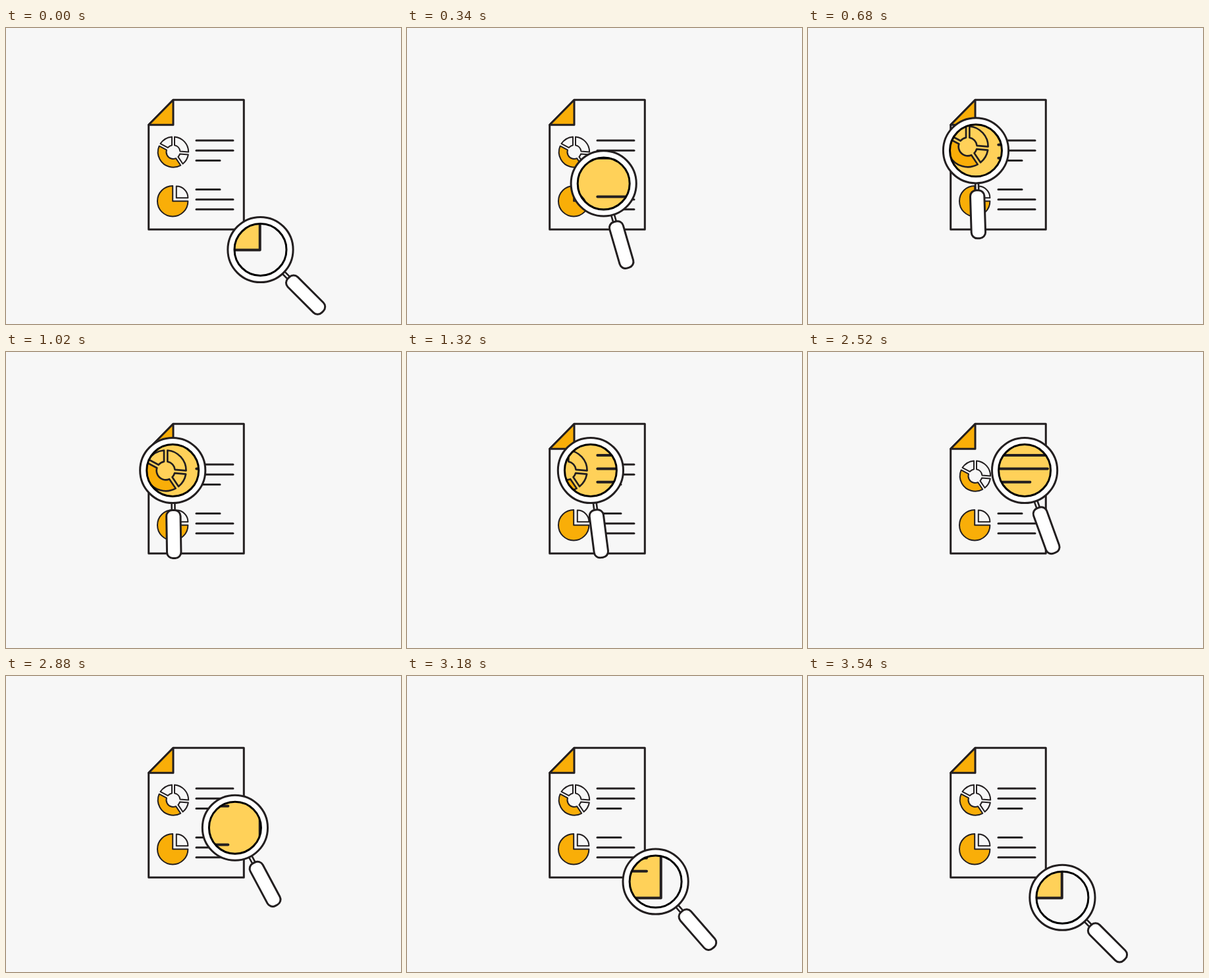
An HTML page with a canvas that plays this animation: 600 by 450 pixels, repeating every 3730 ms.

```html
<!DOCTYPE html>
<html lang="en">
<head>
<meta charset="utf-8">
<title>Report inspection</title>
<style>
  html, body { margin: 0; width: 100%; height: 100%; overflow: hidden; background: #f7f7f7; }
  canvas { display: block; width: 600px; height: 450px; }
</style>
</head>
<body>
<canvas id="stage" width="600" height="450"></canvas>
<script>
const ctx = document.getElementById('stage').getContext('2d');
const LOOP = 3730;
const PAPER = '#f7f7f7', INK = '#231f20', ORANGE = '#f9ae08', GLOW = '#ffd159';
const RAD = Math.PI / 180;

// Lens poses; the tilt of the handle is in degrees from straight down.
const POSES = [
  { t: 5, x: 386.5, y: 337, tilt: 45 },
  { t: 908, x: 249.5, y: 180, tilt: 0 },
  { t: 2690, x: 329.5, y: 180, tilt: 20 },
  { t: 3590, x: 386.5, y: 337, tilt: 45 }
];

// Cubic Bezier (0.25, 0.1, 0.25, 1), solved by bisection.
function ease(u) {
  let low = 0, high = 1;
  for (let i = 0; i < 24; i++) {
    const s = (low + high) / 2;
    if (0.75 * s * (1 - s) + s ** 3 < u) low = s; else high = s;
  }
  const s = low, r = 1 - s;
  return 0.3 * s * r * r + 3 * r * s * s + s ** 3;
}

function poseAt(time) {
  let i = 0;
  while (i < POSES.length - 2 && time >= POSES[i + 1].t) i++;
  const a = POSES[i], b = POSES[i + 1];
  const u = Math.min(1, Math.max(0, (time - a.t) / (b.t - a.t)));
  const p = u === 0 || u === 1 ? u : ease(u);
  const mix = key => a[key] + (b[key] - a[key]) * p;
  return { x: mix('x'), y: mix('y'), tilt: mix('tilt') };
}

function paint(fill, width, stroke = INK) {
  if (fill) {
    ctx.fillStyle = fill;
    ctx.fill();
  }
  ctx.strokeStyle = stroke;
  ctx.lineWidth = width;
  ctx.stroke();
}

function polygon(points) {
  ctx.beginPath();
  points.forEach(([x, y]) => ctx.lineTo(x, y));
  ctx.closePath();
}

function circle(x, y, r) {
  ctx.beginPath();
  ctx.arc(x, y, r, 0, 2 * Math.PI);
}

// Ring segment whose straight sides run parallel to the gaps.
function ringSegment(from, to, fill) {
  const outer = 23.2, inner = 10.5, gap = 2;
  const inset = r => Math.asin(gap / r);
  const a = from * RAD, b = to * RAD;
  ctx.beginPath();
  ctx.arc(254, 188.5, outer, a + inset(outer), b - inset(outer));
  ctx.arc(254, 188.5, inner, b - inset(inner), a + inset(inner), true);
  ctx.closePath();
  paint(fill, 2);
}

function pieSlice(x, y, r, from, to, fill) {
  ctx.beginPath();
  ctx.moveTo(x, y);
  ctx.arc(x, y, r, from * RAD, to * RAD);
  ctx.closePath();
  paint(fill, 2);
}

function textLine(y, end) {
  ctx.beginPath();
  ctx.moveTo(289, y);
  ctx.lineTo(end, y);
  paint(null, 3);
}

function drawReport(paper) {
  polygon([[254, 109.3], [361.3, 109.3], [361.3, 306.3], [216.7, 306.3], [216.7, 147.3]]);
  paint(paper, 3);
  polygon([[254, 109.3], [254, 147.3], [216.7, 147.3]]);
  paint(ORANGE, 3);

  ringSegment(-90, 5, paper);
  ringSegment(5, 56, paper);
  ringSegment(56, 208, ORANGE);
  ringSegment(208, 270, paper);

  pieSlice(253.2, 263.2, 23.2, 0, 270, ORANGE);
  pieSlice(258.8, 258.2, 17.6, -90, 0, paper);

  [[171, 345], [186.3, 345], [201.5, 325], [245.6, 325], [260.8, 345], [275.8, 345]]
    .forEach(([y, end]) => textLine(y, end));
}

function drawHandle(tilt) {
  ctx.save();
  ctx.rotate(-tilt * RAD);
  ctx.beginPath();
  ctx.rect(-2.4, 49, 4.8, 14);
  paint(PAPER, 2.6);
  ctx.beginPath();
  ctx.roundRect(-10.7, 60.5, 21.4, 73, 9);
  paint('#fff', 3);
  ctx.restore();
}

function drawMagnifier({ x, y, tilt }) {
  ctx.save();
  ctx.translate(x, y);
  drawHandle(tilt);
  ctx.restore();

  circle(x, y, 49.6);
  paint('#fff', 3);

  ctx.save();
  circle(x, y, 39.5);
  ctx.clip();
  ctx.fillStyle = PAPER;
  ctx.fill();
  ctx.translate(288, 213);
  ctx.scale(4 / 3, 4 / 3);
  ctx.translate(-288, -213);
  drawReport(GLOW);
  ctx.restore();

  circle(x, y, 39.5);
  paint(null, 3, '#000');
}

function frame() {
  ctx.fillStyle = PAPER;
  ctx.fillRect(0, 0, 600, 450);
  drawReport(PAPER);
  drawMagnifier(poseAt(performance.now() % LOOP));
  requestAnimationFrame(frame);
}

ctx.lineCap = ctx.lineJoin = 'round';
frame();
</script>
</body>
</html>
```
